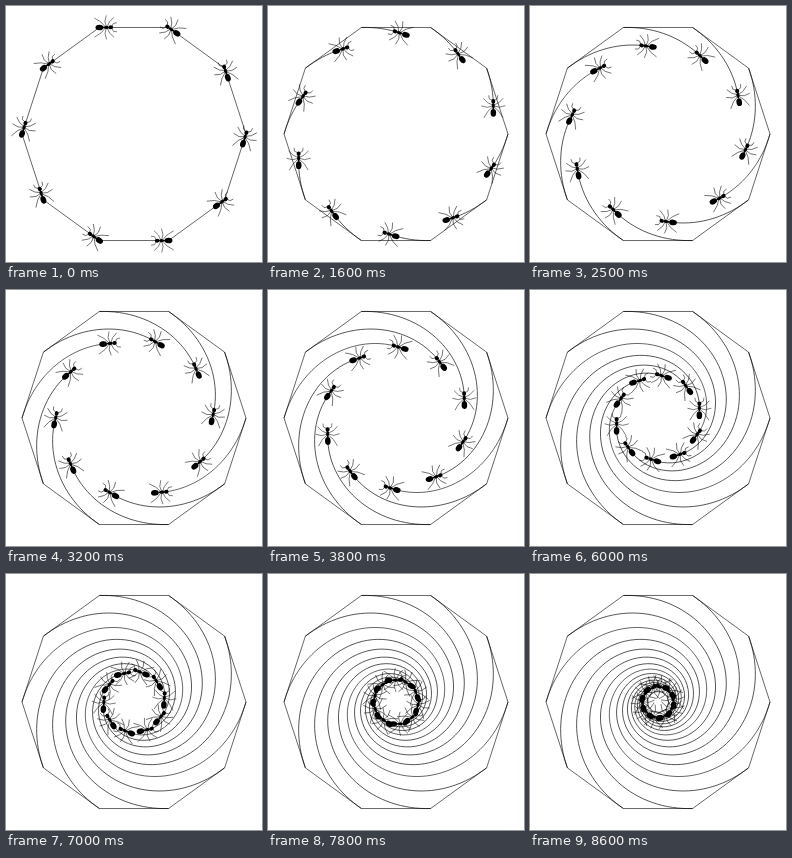
Write an HTML page that moves like this. It is 256x256 px and loops after 9600 ms.

```html
<!DOCTYPE html>
<html lang="en">
<head>
<meta charset="utf-8">
<title>Ant pursuit</title>
<style>
  html, body { margin: 0; width: 100%; height: 100%; overflow: hidden; background: #fff; }
  svg { display: block; width: 100%; height: 100%; }
  .line { fill: none; stroke: #000; stroke-width: .6; stroke-linejoin: round; }
  .limbs { fill: none; stroke: #000; stroke-width: .5; stroke-linejoin: round; }
</style>
</head>
<body>
<svg viewBox="0 0 256 256">
  <defs>
    <!-- The ant is centred on the origin and faces right. -->
    <g id="ant">
      <ellipse cx="-5" rx="3.9" ry="2.8"/>
      <ellipse cx="-.4" rx="1.1" ry=".9"/>
      <ellipse cx="2.1" rx="2.4" ry="1.6"/>
      <ellipse cx="6.4" rx="2.3" ry="2"/>
      <g id="side" class="limbs">
        <path d="M3 -1L5 -5.5L9.5 -10"/>
        <path d="M1.8 -1L.5 -6L2 -12"/>
        <path d="M.6 -1L-3.5 -5.5L-10 -9.5"/>
        <path d="M7.5 -1.2L9 -4L12.5 -4.5"/>
      </g>
      <use href="#side" transform="scale(1 -1)"/>
    </g>
  </defs>
  <g id="scene" transform="translate(128 128)"></g>
</svg>
<script>
const COUNT = 10, RADIUS = 112, STRIDE = 5.05;
const TURN = 2 * Math.PI / COUNT;
const INWARD = 17.4 * Math.PI / 180;
const LOOP = 9600, HOLD = 1000, TICK = 100, LAST = 77;
const degrees = angle => angle * 180 / Math.PI;
const scene = document.getElementById('scene');

function add(name, attributes) {
  const node = document.createElementNS('http://www.w3.org/2000/svg', name);
  for (const key in attributes) node.setAttribute(key, attributes[key]);
  return scene.appendChild(node);
}

// One walker's trail; the others are rotated copies.
const trail = [{ x: RADIUS, y: 0, heading: 0 }];
for (let i = 0; i <= LAST; i++) {
  const { x, y } = trail[i];
  const heading = Math.atan2(y, x) + Math.PI / 2 + INWARD;
  trail.push({ x: x + STRIDE * Math.cos(heading), y: y + STRIDE * Math.sin(heading), heading });
}

const indices = Array.from({ length: COUNT }, (_, i) => i);
add('polygon', {
  class: 'line',
  points: indices.map(i => [RADIUS * Math.cos(i * TURN), RADIUS * Math.sin(i * TURN)]).join(' ')
});
const lines = indices.map(i => add('polyline', { class: 'line', transform: `rotate(${degrees(i * TURN)})` }));
const ants = indices.map(() => add('use', { href: '#ant' }));

function draw(step) {
  const points = trail.slice(0, step + 2).map(p => `${p.x},${p.y}`).join(' ');
  const { x, y, heading } = trail[step + 1];
  indices.forEach(i => {
    lines[i].setAttribute('points', points);
    // Every ant keeps its head towards the top.
    const facing = heading + i * TURN;
    const flip = Math.sin(facing) > .02 ? 180 : 0;
    ants[i].setAttribute('transform',
      `rotate(${degrees(i * TURN)}) translate(${x} ${y}) rotate(${degrees(heading) + flip})`);
  });
}

const start = performance.now();
let shown = -1;
function frame() {
  const time = (performance.now() - start) % LOOP;
  const step = Math.max(0, Math.min(LAST, Math.floor((time - HOLD) / TICK) + 1));
  if (step !== shown) draw(shown = step);
  requestAnimationFrame(frame);
}
frame();
</script>
</body>
</html>
```
